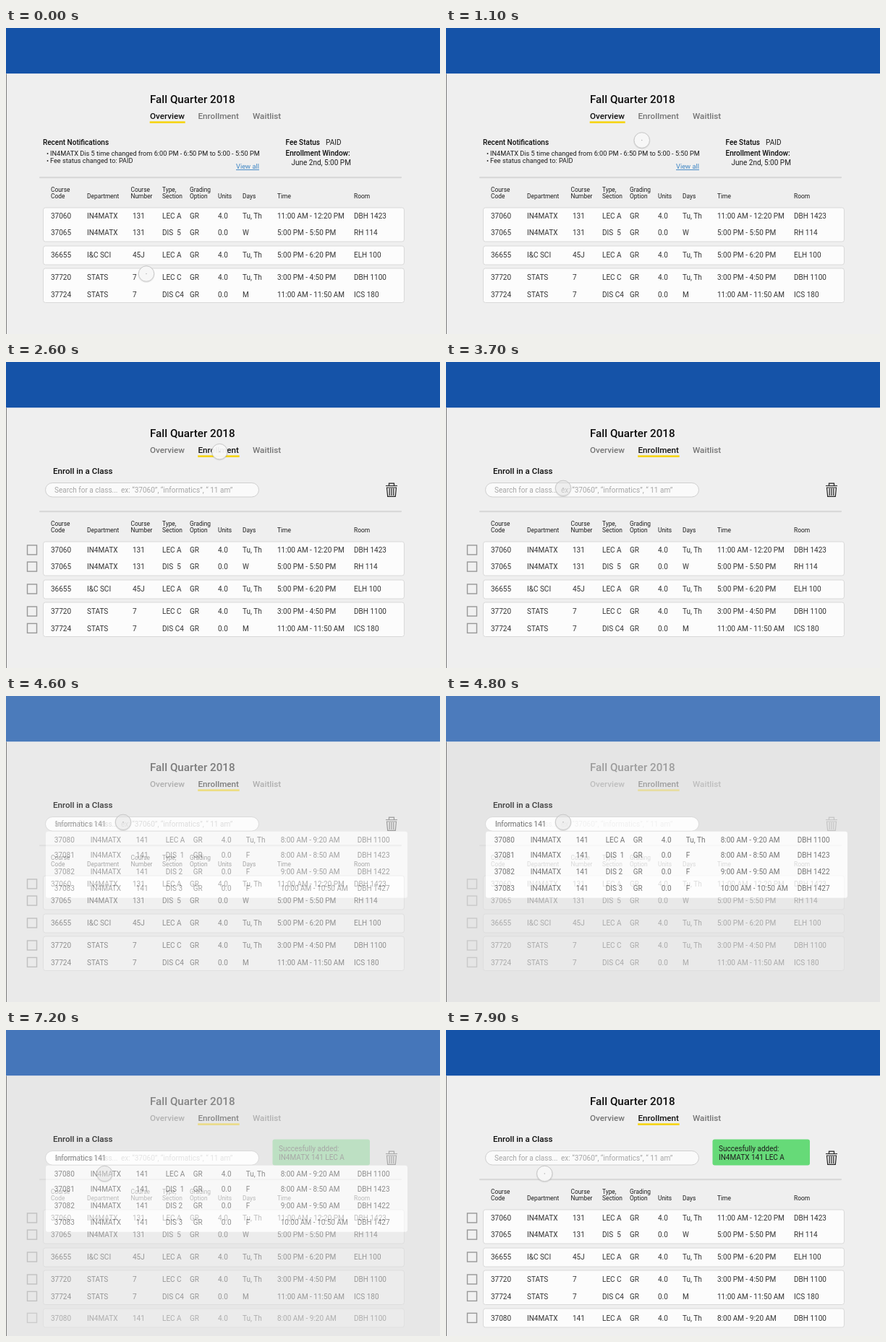
Animation of 600x424 px, one loop 8 s. Source, as an HTML page:

```html
<!DOCTYPE html>
<html lang="en">
<head>
<meta charset="utf-8">
<title>Course enrollment</title>
<style>
  html, body { margin: 0; width: 100%; height: 100%; overflow: hidden; background: #fff; }
  svg { display: block; width: 100vw; height: 100vh; }
  text { font-family: Roboto, sans-serif; font-size: 10px; fill: #333; white-space: pre; }
  .m { font-weight: 500; fill: #0c0c0c; }
  .dark { fill: #1c1c1c; }
  .card { fill: #fcfcfc; stroke: #d9d9d9; }
  .box { fill: #f1f1f1; stroke: #989898; stroke-width: 1.4; }
</style>
</head>
<body>
<svg id="stage" viewBox="0 0 600 424" xmlns="http://www.w3.org/2000/svg"></svg>
<script>
const LOOP = 8000;
const COLS = [62, 112, 175, 216, 254, 293, 327, 375, 481];

const ENROLLED = [
  [264.1, '37060|IN4MATX|131|LEC A|GR|4.0|Tu, Th|11:00 AM - 12:20 PM|DBH 1423'],
  [287.3, '37065|IN4MATX|131|DIS  5|GR|0.0|W|5:00 PM - 5:50 PM|RH 114'],
  [318.2, '36655|I&amp;C SCI|45J|LEC A|GR|4.0|Tu, Th|5:00 PM - 6:20 PM|ELH 100'],
  [349.2, '37720|STATS|7|LEC C|GR|4.0|Tu, Th|3:00 PM - 4:50 PM|DBH 1100'],
  [372.6, '37724|STATS|7|DIS C4|GR|0.0|M|11:00 AM - 11:50 AM|ICS 180']
];
const ADDED = [402.6, '37080|IN4MATX|141|LEC A|GR|4.0|Tu, Th|8:00 AM - 9:20 AM|DBH 1100'];
const RESULTS = [
  [202.6, ADDED[1]],
  [224.1, '37081|IN4MATX|141|DIS  1|GR|0.0|F|8:00 AM - 8:50 AM|DBH 1423'],
  [246.6, '37082|IN4MATX|141|DIS 2|GR|0.0|F|9:00 AM - 9:50 AM|DBH 1422'],
  [270.3, '37083|IN4MATX|141|DIS 3|GR|0.0|F|10:00 AM - 10:50 AM|DBH 1427']
];

const text = (x, y, s, cls = '', style = '') =>
  `<text x="${x}" y="${y}" class="${cls}" style="${style}">${s}</text>`;
const rect = (x, y, w, h, r, attrs) =>
  `<rect x="${x}" y="${y}" width="${w}" height="${h}" rx="${r}" ${attrs}/>`;
const row = ([y, cells], dx = 0, cls = '') =>
  cells.split('|').map((s, i) => text(COLS[i] + dx, y, s, cls)).join('');
const card = (y, h) => rect(51.5, y, 499, h, 3, 'class="card"');

const header = rect(0, 0, 600, 63.5, 0, 'fill="#1553a8"');
const background = rect(0, 63.5, 600, 361, 0, 'fill="#efefef"');

function titleBar(active) {
  const tabs = [['Overview', 199, 49], ['Enrollment', 265.5, 57.5], ['Waitlist', 341, 40]];
  return text(199, 104, 'Fall Quarter 2018', 'm', 'font-size:15.2px') +
    tabs.map(([name, x, w], i) => {
      const on = i === active;
      return text(x, 126, name, 'm', `font-size:11.7px;fill:${on ? '#111' : '#757575'}`) +
        (on ? rect(x - 0.3, 129.3, w, 2.6, 0, 'fill="#f6d412"') : '');
    }).join('');
}

function table(rows) {
  const heads = ['Course|Code', 'Department', 'Course|Number', 'Type,|Section',
    'Grading|Option', 'Units', 'Days', 'Time', 'Room'];
  const labels = heads.map((h, i) => {
    const lines = h.split('|');
    const x = i === 2 ? 172.5 : COLS[i];
    return lines.map((s, k) =>
      text(x, 236.3 - 9.3 * (lines.length - 1 - k), s, 'dark', 'font-size:8.4px')).join('');
  }).join('');
  return rect(46, 205.9, 501, 2.3, 1, 'fill="#d9d9d9"') + labels +
    card(249, 47) + card(302, 26) + card(333, 47.5) +
    (rows.length > 5 ? card(386, 26) : '') +
    rows.map(r => row(r)).join('');
}

function overviewBody() {
  const small = 'font-size:9.2px';
  return background + titleBar(0) +
    text(51, 161.7, 'Recent Notifications', 'm') +
    text(56, 176.6, '•', 'dark', small) +
    text(61, 176.6, 'IN4MATX Dis 5 time changed from 6:00 PM - 6:50 PM to 5:00 - 5:50 PM', 'dark', small) +
    text(56, 187.2, '•', 'dark', small) +
    text(61, 187.2, 'Fee status changed to: PAID', 'dark', small) +
    text(318, 195, 'View all', '', 'font-size:9.3px;fill:#3f86c4;text-decoration:underline') +
    text(386.5, 161.7, 'Fee Status', 'm') + text(442, 161.7, 'PAID', 'dark') +
    text(386.5, 176.6, 'Enrollment Window:', 'm') +
    text(394.5, 190, 'June 2nd, 5:00 PM', 'dark') +
    table(ENROLLED);
}

const formTitle = text(65, 154.6, 'Enroll in a Class', 'm', 'font-size:11.6px');

const trash = `<g fill="none" stroke="#222" stroke-width="1.2">
  <path d="M525 171.5H541M529.5 171V168.2H536.5V171M526.5 174H539.5L538.3 186.3H527.7Z"/>
  <path d="M530.2 175V185M533 175V185M535.8 175V185"/></g>`;

function formBody(rows, withTrash) {
  const hint = 'fill:#a6a6a6';
  return background + titleBar(1) + formTitle +
    rect(54.5, 167.5, 295, 19.5, 9.75, 'fill="#fafafa" stroke="#cfcfcf"') +
    text(67, 180.6, 'Search for a class...', '', hint) +
    text(159, 180.6, 'ex: “37060”, “informatics”, “ 11 am”', '', hint) +
    (withTrash ? trash : '') + table(rows) +
    rows.map(([y]) => rect(29.5, y - 10.2, 13, 13, 0, 'class="box"')).join('');
}

function resultsBody() {
  return formBody(ENROLLED, false) +
    rect(0, 63.5, 600, 361, 0, 'fill="#d1d1d1" fill-opacity=".74"') +
    formTitle +
    rect(55, 168, 294, 18.8, 9.4, 'fill="#fff"') +
    text(68, 180.6, 'Informatics 141', 'dark') +
    rect(55, 187.7, 500, 92, 3, 'fill="#fdfdfd"') +
    RESULTS.map(r => row(r, 4.7, 'dark')).join('');
}

const notice = rect(368.5, 151.5, 134.5, 36, 3, 'fill="#66da78"') +
  text(377, 167.6, 'Succesfully added:', 'dark') +
  text(377, 180, 'IN4MATX 141 LEC A', 'dark');

const page = (id, body) => `<g id="${id}">${header}${body}</g>`;
document.getElementById('stage').innerHTML =
  rect(0, 0, 600, 424, 0, 'fill="#fff"') +
  page('form', formBody(ENROLLED, true)) +
  `<g id="overview">${overviewBody()}</g>` +
  page('results', resultsBody()) +
  page('done', formBody([...ENROLLED, ADDED], true) + notice) +
  rect(0, 63.5, 0.9, 361, 0, 'fill="#707070"') +
  `<g id="cursor"><circle r="11.6" cy=".7" fill="#000" fill-opacity=".08"/>
    <circle id="disc" r="10.7" stroke="#c4c4c4" stroke-width=".9"/>
    <circle r=".7" fill="#aaa"/></g>`;

const el = Object.fromEntries(['form', 'overview', 'results', 'done', 'cursor', 'disc']
  .map(id => [id, document.getElementById(id)]));

const PATH = [
  [50, 194, 340.5], [350, 262, 282], [600, 338, 215], [900, 261, 167], [1250, 278, 147],
  [1600, 299.5, 122.5], [2550, 299.5, 122.5], [2750, 283, 129], [3400, 179, 171],
  [3500, 162, 174.8], [6150, 162, 174.8], [6200, 159, 176], [6680, 136.3, 199], [LOOP, 136.3, 199]
];
const PRESSES = [[1850, 2350], [3630, 5150], [6930, 7850]];

const ramp = (t, a, b) => Math.min(1, Math.max(0, (t - a) / (b - a)));
const easeInOut = p => p < 0.5 ? 4 * p ** 3 : 1 - 4 * (1 - p) ** 3;

function cursorAt(t) {
  if (t <= PATH[0][0]) return PATH[0].slice(1);
  const i = PATH.findIndex(k => k[0] >= t);
  const [t0, x0, y0] = PATH[i - 1], [t1, x1, y1] = PATH[i];
  const p = ramp(t, t0, t1);
  return [x0 + (x1 - x0) * p, y0 + (y1 - y0) * p];
}

function show(node, opacity) {
  node.style.display = opacity > 0 ? '' : 'none';
  node.setAttribute('opacity', opacity);
}

function render(t) {
  const slide = easeInOut(ramp(t, 1957, 2295));
  const toResults = ramp(t, 4260, 5160);
  const toDone = ramp(t, 6930, 7830);
  show(el.overview, slide < 1 ? 1 : 0);
  el.overview.setAttribute('transform', `translate(${-600 * slide} 0)`);
  show(el.form, 1 - toResults);
  show(el.results, toResults * (1 - toDone));
  show(el.done, toDone);

  const press = Math.max(...PRESSES.map(([a, b]) => ramp(t, a, a + 60) - ramp(t, b - 60, b)));
  el.cursor.setAttribute('transform', `translate(${cursorAt(t).join(' ')})`);
  el.disc.setAttribute('fill', `rgba(248,248,248,${0.95 - 0.5 * press})`);
}

const start = performance.now();
function tick() {
  render((performance.now() - start) % LOOP);
  requestAnimationFrame(tick);
}
tick();
</script>
</body>
</html>
```
